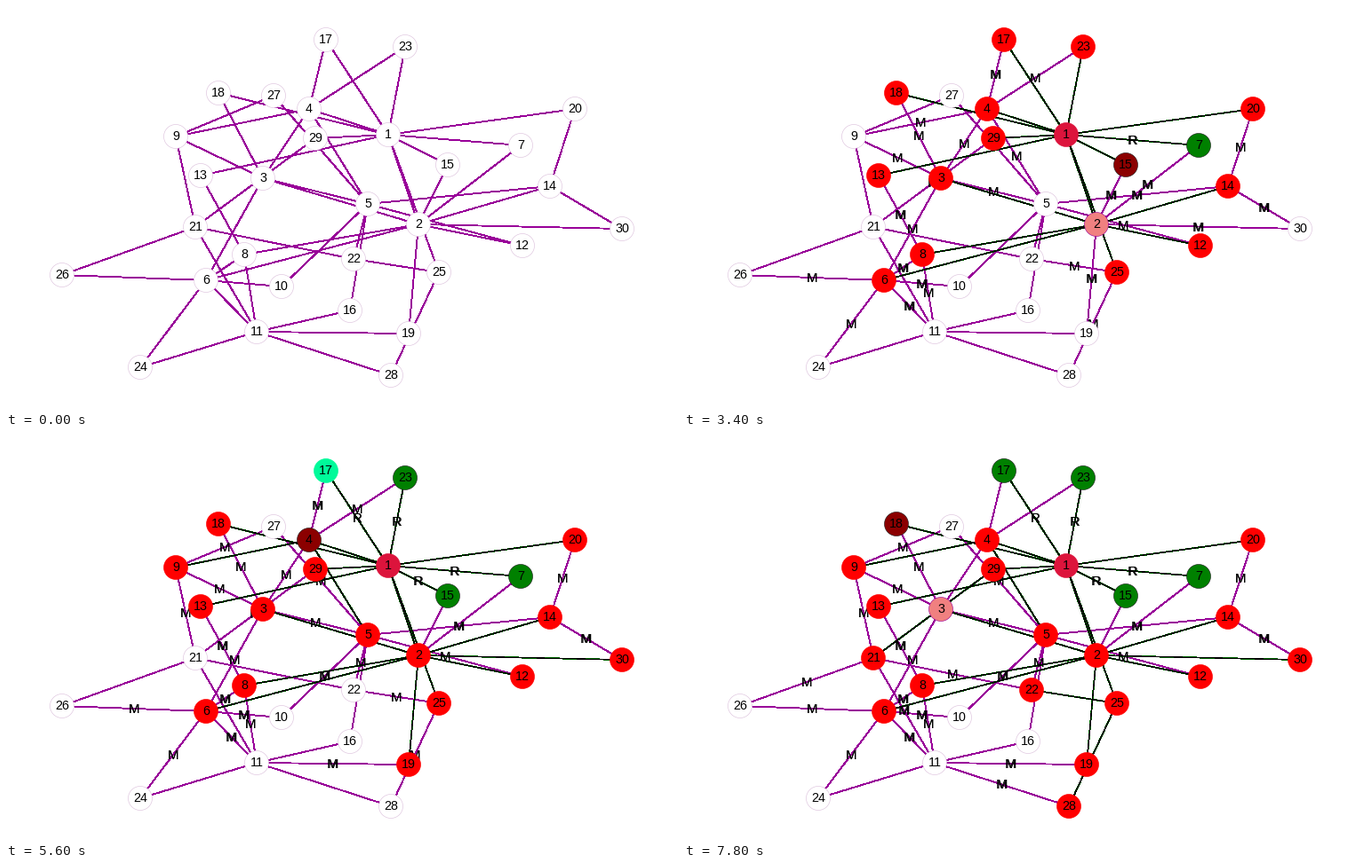
These frames come from a looping animation (756x454 px, 8 s). A matplotlib script:

```python
import matplotlib.pyplot as plt
from matplotlib.animation import FuncAnimation
from matplotlib.patches import Circle

W, H, DPI = 756, 454, 100
PX = 72 / DPI          # one pixel in points
FRAMES, STEP_MS = 40, 200
RADIUS = 13.5
ROOT = 1
PURPLE = "#990099"

# Key points of the layout, nodes 1, 2, 3, ...
SPOTS = [
    (430, 145), (464, 246), (289, 194), (341, 116), (407, 223), (225, 309),
    (579, 157), (268, 280), (191, 147), (310, 316), (282, 367), (581, 270),
    (219, 191), (612, 203), (497, 179), (387, 343), (360, 38), (239, 98),
    (453, 369), (640, 116), (213, 249), (391, 285), (449, 46), (151, 407),
    (487, 300), (63, 303), (301, 101), (433, 416), (348, 149), (693, 251),
]
POS = dict(enumerate(SPOTS, 1))

# The graph grows from the chain 1-2-3: each newcomer joins two older nodes.
JOINS = [
    (1, 3), (3, 4), (2, 3), (1, 2), (2, 6), (3, 4), (5, 6), (6, 8), (2, 5),
    (1, 8), (2, 5), (1, 2), (5, 11), (1, 4), (1, 3), (2, 11), (1, 14),
    (9, 11), (5, 21), (1, 4), (6, 11), (1, 22), (6, 21), (5, 9), (11, 25),
    (1, 21), (2, 14),
]
EDGES = [(1, 2), (2, 3)]
EDGES += [(old, new) for new, pair in enumerate(JOINS, 4) for old in pair]
NEAR = {n: sorted(a + b - n for a, b in EDGES if n in (a, b)) for n in POS}


def edge(a, b):
    return min(a, b), max(a, b)


def flood(count):
    """Deliver `count` messages in queue order; the next one is in progress."""
    queue = [(ROOT, n) for n in NEAR[ROOT]]
    parent = {ROOT: None}
    heard = {n: set() for n in POS}
    for i in range(count):
        a, b = queue[i]
        heard[b].add(a)
        if b not in parent:
            parent[b] = a
            queue += [(b, n) for n in NEAR[b] if n != a]
    done = {n for n in POS if len(heard[n]) == len(NEAR[n])}
    return parent, done, queue[count:]


def look(frame):
    """Node fills, tree edges and edge letters for one frame."""
    fills = {n: "white" for n in POS}
    if frame == 0:
        return fills, set(), {}
    parent, done, pending = flood(frame)
    for n in parent:
        fills[n] = "green" if n in done else "red"
    sender, receiver = pending[0]
    fills[sender] = "mediumspringgreen" if sender in done else "lightcoral"
    fills[receiver] = "darkred" if receiver in parent else "#868686"
    fills[ROOT] = "crimson"
    tree = {edge(n, p) for n, p in parent.items() if p}
    letters = {edge(n, parent[n]): "R" for n in done}
    letters.update({edge(a, b): "M" for a, b in pending})
    return fills, tree, letters


def rim(fill):
    if fill == "white":
        return "#dcc0dc"
    if fill in ("green", "darkred"):
        return "#202020"
    return PURPLE if fill in ("lightcoral", "#868686") else fill


fig = plt.figure(figsize=(W / DPI, H / DPI), dpi=DPI, facecolor="white")
ax = fig.add_axes([0, 0, 1, 1])
ax.set_xlim(0, W)
ax.set_ylim(H, 0)
ax.axis("off")


def line(a, b, width, color, z):
    # without antialiasing a stroke covers about one pixel more than its width
    xs, ys = zip(POS[a], POS[b])
    return ax.plot(xs, ys, lw=width * PX, color=color, zorder=z,
                   antialiased=False)[0]


def label(x, y, text, size, z):
    return ax.text(x, y, text, ha="center", va="center", zorder=z,
                   family="Liberation Sans", fontsize=size * PX, color="black")


outer, core, notes, discs = {}, {}, {}, {}
for a, b in EDGES:
    (x0, y0), (x1, y1) = POS[a], POS[b]
    outer[a, b] = line(a, b, 0.9, PURPLE, 1)
    core[a, b] = line(a, b, 0.2, "black", 3)
    # two prints half a pixel apart give the letters their weight
    notes[a, b] = [label((x0 + x1) / 2 + dx, (y0 + y1) / 2 + 1, "", 15, 4)
                   for dx in (-0.25, 0.25)]
for n, (x, y) in POS.items():
    discs[n] = ax.add_patch(Circle((x, y), RADIUS, lw=0.6 * PX, zorder=5))
    label(x, y, str(n), 14.3, 6)


def draw(frame):
    fills, tree, letters = look(frame)
    for e in EDGES:
        joined = e in tree
        outer[e].set_color("darkgreen" if joined else PURPLE)
        outer[e].set_zorder(2 if joined else 1)
        core[e].set_visible(joined)
        for note in notes[e]:
            note.set_text(letters.get(e, ""))
    for n, disc in discs.items():
        disc.set_facecolor(fills[n])
        disc.set_edgecolor(rim(fills[n]))
    return []


anim = FuncAnimation(fig, draw, frames=FRAMES, interval=STEP_MS,
                     init_func=lambda: draw(0), repeat=True, repeat_delay=0)
plt.show()
```
